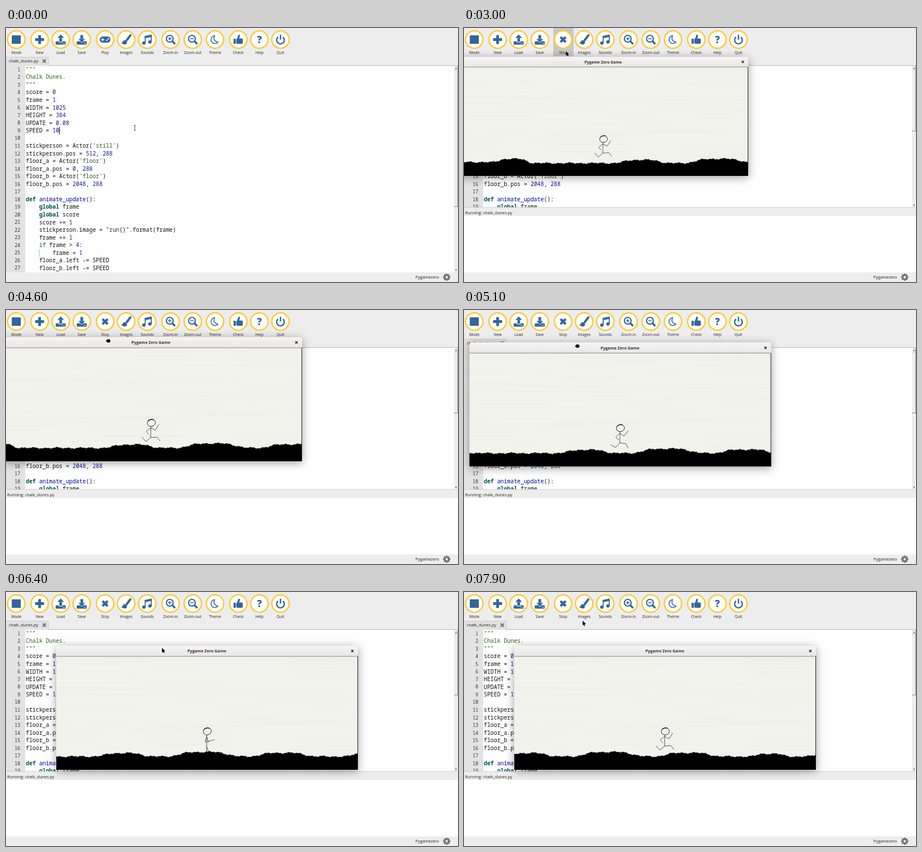
Write an HTML page with a canvas that moves like this. It is 800 px wide and 450 px high and loops after 8000 ms.

```html
<!DOCTYPE html>
<html lang="en">
<head>
<meta charset="utf-8">
<title>Code editor and game</title>
<style>
html, body { margin: 0; width: 100%; height: 100%; overflow: hidden; background: #fff; }
canvas { display: block; width: 800px; height: 450px; }
</style>
</head>
<body>
<canvas id="stage" width="800" height="450"></canvas>
<script>
const ctx = document.getElementById('stage').getContext('2d');
const LOOP = 8000, TICK = 100;
const UI = '"Open Sans", "Noto Sans", sans-serif';
const MONO = '"Noto Sans Mono", "DejaVu Sans Mono", monospace';
const BLUE = '#336699', YELLOW = '#fdcb35', CHROME = '#eeedee';
const CHAR_W = 5.91, LINE_H = 13.53;
const RUN_AT = 2400, OPEN_AT = 2850, OPEN_MS = 250;
const WIN_W = 534, WIN_H = 220, BAR_H = 19;
const STEP_MS = 81.25, STEP_PX = 5.21;
const FILE = 'chalk_dunes.py';

const code = `"""
Chalk Dunes.
"""
score = 0
frame = 1
WIDTH = 1025
HEIGHT = 384
UPDATE = 0.08
SPEED = 10

stickperson = Actor('still')
stickperson.pos = 512, 288
floor_a = Actor('floor')
floor_a.pos = 0, 288
floor_b = Actor('floor')
floor_b.pos = 2048, 288

def animate_update():
    global frame
    global score
    score += 1
    stickperson.image = "run{}".format(frame)
    frame += 1
    if frame > 4:
        frame = 1
    floor_a.left -= SPEED
    floor_b.left -= SPEED`.split('\n');

// Hills: centre, half width, height
const hills = [[30, 45, 2], [100, 28, 8], [338, 36, 6], [480, 46, 8],
  [620, 42, 6.5], [765, 25, 5], [865, 25, 4]];

const mix = (a, b, p) => a + (b - a) * p;

// Eased move from point a to point b
function glide(t, t0, t1, a, b) {
  const p = Math.min(1, Math.max(0, (t - t0) / (t1 - t0)));
  const e = p * p * (3 - 2 * p);
  return [mix(a[0], b[0], e), mix(a[1], b[1], e)];
}

const windowAt = t => glide(t, 4700, 6100, [-10, 48], [89, 95]);

function rect(x, y, w, h, color) {
  ctx.fillStyle = color;
  ctx.fillRect(x, y, w, h);
}

function text(str, x, y, font, color, align = 'left') {
  ctx.font = font;
  ctx.fillStyle = color;
  ctx.textAlign = align;
  ctx.fillText(str, x, y);
}

function trace(pts) {
  ctx.beginPath();
  for (let i = 0; i < pts.length; i += 2) ctx.lineTo(pts[i], pts[i + 1]);
}

function line(pts, color, width = 1) {
  trace(pts);
  ctx.strokeStyle = color;
  ctx.lineWidth = width;
  ctx.stroke();
}

function shape(pts, color) {
  trace(pts);
  ctx.fillStyle = color;
  ctx.fill();
}

function disc(x, y, r, color) {
  ctx.beginPath();
  ctx.arc(x, y, r, 0, 7);
  ctx.fillStyle = color;
  ctx.fill();
}

function ring(x, y, r, color, width, from = 0, to = Math.PI * 2) {
  ctx.beginPath();
  ctx.arc(x, y, r, from, to);
  ctx.strokeStyle = color;
  ctx.lineWidth = width;
  ctx.stroke();
}

function box(x, y, w, h, r, color) {
  ctx.beginPath();
  ctx.roundRect(x, y, w, h, r);
  ctx.fillStyle = color;
  ctx.fill();
}

function cross(x, y, r, color, width) {
  line([x - r, y - r, x + r, y + r], color, width);
  line([x - r, y + r, x + r, y - r], color, width);
}

function tray(tip, dir) {
  box(-9, 3, 18, 6, 1.5, BLUE);
  const arrow = (grow, color) => {
    const base = tip + dir * 6, tail = tip + dir * 13;
    shape([-6 - grow, base + dir * grow, 6 + grow, base + dir * grow, 0, tip - dir * grow], color);
    line([0, base, 0, tail + dir * grow], color, 4.8 + 2 * grow);
  };
  arrow(1, '#fff');
  arrow(0, BLUE);
  for (const x of [4, 6.3]) rect(x, 6, 1.3, 1.3, '#fff');
}

function lens(plus) {
  line([3, 3, 8, 8], BLUE, 3.2);
  ring(-1.5, -1.5, 6, BLUE, 2.2);
  rect(-4.5, -2.2, 6, 1.5, BLUE);
  if (plus) rect(-2.2, -4.5, 1.5, 6, BLUE);
}

const icons = {
  Mode() { rect(-8, -7.5, 16, 15, BLUE); },
  New() {
    box(-8, -2.4, 16, 4.8, 1, BLUE);
    box(-2.4, -8, 4.8, 16, 1, BLUE);
  },
  Load() { tray(-9, 1); },
  Save() { tray(5, -1); },
  Play() {
    box(-9.5, -5.5, 19, 11, 5.5, BLUE);
    rect(-7, -.8, 5.4, 1.6, '#fff');
    rect(-5.1, -2.7, 1.6, 5.4, '#fff');
    disc(3.2, 1.3, 1.3, '#fff');
    disc(5.8, -1.3, 1.3, '#fff');
  },
  Stop() { cross(0, 0, 4.6, BLUE, 4.2); },
  Images() {
    ctx.lineCap = 'round';
    line([7.5, -7.5, 1, 1], BLUE, 3.8);
    disc(-2.5, 5, 3.8, BLUE);
    shape([-2, 1, -2, 8.8, -9, 6.5], BLUE);
  },
  Sounds() {
    line([-4.5, -4.2, 8, -7], BLUE, 4);
    for (const [x, y] of [[-6, 6.3], [4.7, 4.2]]) {
      line([x + 2.4, y - 10, x + 2.4, y], BLUE, 1.8);
      disc(x, y, 3, BLUE);
    }
  },
  'Zoom-in'() { lens(true); },
  'Zoom-out'() { lens(false); },
  Theme() {
    ctx.beginPath();
    ctx.arc(0, 0, 7, .65, 4.6);
    ctx.quadraticCurveTo(-4.5, 3, 5.6, 4.2);
    ctx.strokeStyle = BLUE;
    ctx.lineWidth = 1.6;
    ctx.stroke();
  },
  Check() {
    box(-8.5, -1.5, 4, 9, .8, BLUE);
    box(-3.6, -2, 11.6, 9.6, 2.5, BLUE);
    ctx.lineCap = 'round';
    line([-1, 0, 1.3, -6.8], BLUE, 3.4);
  },
  Help() { text('?', 0, 6.2, `800 17px ${UI}`, BLUE, 'center'); },
  Quit() {
    ring(0, .8, 6.8, BLUE, 2.4, -.9, Math.PI + .9);
    line([0, -8.5, 0, 0], BLUE, 2.4);
  }
};

const toolbar = 'Mode | New Load Save | Play Images Sounds | Zoom-in Zoom-out Theme | Check Help Quit';

function drawToolbar(running, hover) {
  rect(0, 0, 800, 67, CHROME);
  if (hover) rect(158, 0, 36, 50, '#c9c8c9');
  let x = 18.2;
  for (const name of toolbar.split(' ')) {
    if (name === '|') {
      x += 4;
      continue;
    }
    const label = name === 'Play' && running ? 'Stop' : name;
    disc(x, 20.5, 16, '#fff');
    ring(x, 20.5, 15.4, YELLOW, 2.5);
    ctx.save();
    ctx.translate(x, 20.5);
    icons[label]();
    ctx.restore();
    text(label, x, 45.5, `6.7px ${UI}`, '#222', 'center');
    x += name.startsWith('Zoom') ? 39.3 : 37.3;
  }
  rect(0, 66, 800, 1, '#bdbdbd');
  box(0, 51.5, 75.5, 15.5, [0, 2, 0, 0], '#bdbdbd');
  box(0, 52.3, 74.7, 14.7, [0, 2, 0, 0], '#e3e2e3');
  text(FILE, 5, 61.3, `7.3px ${UI}`, '#222');
  cross(67.7, 58.7, 2.8, '#777', 2.2);
}

function tokenColor(tok, prev) {
  if (/^(def|global|if)$/.test(tok)) return '#005050';
  if (prev === 'def') return '#0000a0';
  if (/^\d/.test(tok)) return '#16168b';
  if (tok[0] === "'") return '#35581f';
  if (tok[0] === '"') return '#2c2c44';
  return '#111';
}

function drawLine(str, n) {
  const y = 76.9 + n * LINE_H;
  text(n + 1, 25.3, y - .2, `8.4px ${MONO}`, '#333', 'right');
  if (n < 3) return text(str, 35, y, `9.85px ${MONO}`, '#2d6414');
  let prev = '';
  for (const m of str.matchAll(/'[^']*'|"[^"]*"|\d+(\.\d+)?|\w+|[^\w\s'"]+/g)) {
    const bold = /^(def|global)$/.test(m[0]) ? 'bold ' : '';
    text(m[0], 35 + m.index * CHAR_W, y, `${bold}9.85px ${MONO}`, tokenColor(m[0], prev));
    prev = m[0];
  }
}

function drawScrollbar(bottom, thumbEnd) {
  rect(793, 67, 7, bottom - 67, '#efeeef');
  rect(793, 74.5, 7, .7, '#bbb');
  rect(799, 67, 1, thumbEnd - 67, '#888');
  rect(793, thumbEnd - 1, 7, 1, '#888');
  shape([795, 72.5, 798, 72.5, 796.5, 70], '#444');
  shape([795, bottom - 5, 798, bottom - 5, 796.5, bottom - 2.5], '#444');
}

function drawEditor(bottom, thumbEnd, caret) {
  ctx.save();
  ctx.beginPath();
  ctx.rect(0, 67, 800, bottom - 67);
  ctx.clip();
  rect(0, 67, 800, 383, '#fefeff');
  rect(0, 67, 34, 383, '#e3e3e3');
  code.forEach(drawLine);
  rect(58.6, 392, .9, 13, '#aaa');
  if (caret) rect(94, 175, 1, 13.5, '#000');
  drawScrollbar(bottom, thumbEnd);
  ctx.restore();
}

function drawStatus() {
  rect(0, 433, 800, 17, CHROME);
  text('Pygamezero', 766.5, 444.2, `7.3px ${UI}`, '#222', 'right');
  ctx.save();
  ctx.translate(780, 441.5);
  ring(0, 0, 3.6, '#737373', 2.8);
  for (let i = 0; i < 8; i++) {
    ctx.rotate(Math.PI / 4);
    rect(-1.4, -6.5, 2.8, 4, '#737373');
  }
  ctx.restore();
}

function drawOutput() {
  rect(0, 318, 800, 15, CHROME);
  rect(0, 317.5, 800, .8, '#c4c4c4');
  rect(0, 333, 800, 100, '#fff');
  text(`Running: ${FILE}`, 2, 329.8, `7.25px ${UI}`, '#222');
}

function groundHeight(u) {
  let h = 23.5 + .8 * Math.sin(u * .31 + 1) + .6 * Math.sin(u * .13) + .5 * Math.sin(u * .9);
  for (const [mid, half, top] of hills) h += top * Math.exp(-(((u - mid) / half) ** 4));
  return h;
}

function drawGround(scroll) {
  const edge = [];
  for (let x = 0; x <= WIN_W; x += 2) edge.push(x, WIN_H - groundHeight(x + scroll));
  shape([0, WIN_H, ...edge, WIN_W, WIN_H], '#000');
  line(edge, 'rgba(60,60,60,.55)');
}

function drawPaper() {
  ctx.save();
  ctx.beginPath();
  ctx.rect(0, BAR_H, WIN_W, WIN_H - BAR_H);
  ctx.clip();
  rect(0, BAR_H, WIN_W, WIN_H, '#f2f2ed');
  let seed = 7;
  const rand = () => (seed = seed * 16807 % 2147483647) / 2147483647;
  for (let i = 0; i < 90; i++) {
    const tint = rand() < .5 ? 'rgba(255,255,255,.2)' : 'rgba(120,120,90,.03)';
    rect(rand() * WIN_W - 60, BAR_H + rand() * 180, 40 + rand() * 160, 1, tint);
  }
  ctx.restore();
}

// Two-part limb; angles in degrees, 0 hangs down, 90 points ahead
function limb(x, y, upper, lower, len1, len2) {
  const a = upper * Math.PI / 180, b = lower * Math.PI / 180;
  const jx = x + len1 * Math.sin(a), jy = y + len1 * Math.cos(a);
  line([x, y, jx, jy, jx + len2 * Math.sin(b), jy + len2 * Math.cos(b)], '#444', .9);
}

function drawRunner(pose) {
  const s = Math.sin(pose * .72);
  line([266.5, 158, 266, 178], '#444', .9);
  limb(266, 161, mix(-15, -52, s), mix(90, 42, s), 10, 7);
  limb(266, 161, mix(20, 64, s), mix(104, 148, s), 9, 12);
  limb(266, 178, mix(0, -50, s), mix(-10, -140, s), 11, 10);
  limb(266, 178, mix(20, 95, s), mix(-40, 40, s), 11, 9);
  ctx.beginPath();
  ctx.ellipse(267.3, 152, 7.2, 6.2, -.25, 0, 7);
  ctx.strokeStyle = '#222';
  ctx.lineWidth = 1;
  ctx.stroke();
  ctx.beginPath();
  ctx.ellipse(267.3, 152, 7.2, 6.2, -.25, 3.9, 5.5);
  ctx.lineWidth = 1.5;
  ctx.stroke();
}

function drawGame(t) {
  const stalled = t >= 5000 && t < 5200 ? 1 : 0;
  const step = Math.floor((t - OPEN_AT) / STEP_MS + .6) - stalled;
  const [x, y] = windowAt(t);
  const p = Math.min(1, (t - OPEN_AT) / OPEN_MS);
  const scale = 1 - .25 * (1 - p) ** 2;

  ctx.save();
  ctx.globalAlpha = Math.min(1, p * 1.8);
  ctx.translate(0, 120);
  ctx.scale(scale, scale);
  ctx.translate(x, y - 120);

  ctx.save();
  ctx.shadowColor = 'rgba(0,0,0,.38)';
  ctx.shadowBlur = 16;
  ctx.shadowOffsetY = 3;
  const bar = ctx.createLinearGradient(0, 0, 0, BAR_H);
  bar.addColorStop(0, '#f5f4f3');
  bar.addColorStop(1, '#e9e7e5');
  box(0, 0, WIN_W, WIN_H, [4, 4, 0, 0], bar);
  ctx.restore();
  text('Pygame Zero Game', 266.5, 12.2, `bold 7.2px ${UI}`, '#333', 'center');
  cross(524, 9.5, 1.9, '#222', 1.4);

  drawPaper();
  drawRunner(step % 4);
  drawGround(Math.max(0, (step - 2) * STEP_PX));
  rect(0, BAR_H - .5, WIN_W, 1, '#8a8886');
  rect(WIN_W - 1, BAR_H, 1, WIN_H - BAR_H, '#222');
  ctx.restore();
}

function drawBeam(x, y) {
  rect(x - .5, y - 4.5, 1, 9, '#555');
  for (const end of [-5, 4]) rect(x - 2, y + end, 4, 1, '#777');
}

function drawArrow(x, y) {
  const head = [x, y, x, y + 8, x + 5.7, y + 5.6];
  line([...head, x, y], 'rgba(255,255,255,.8)', 1.2);
  shape(head, '#000');
  line([x + 2, y + 5, x + 3.8, y + 9], '#000', 1.5);
}

function drawHand(x, y) {
  box(x - 3.8, y - 2, 7.6, 3.4, 1.5, '#111');
  box(x - 2.4, y - 3.2, 5.6, 6, 1.8, '#111');
}

function drawPointer(t) {
  const [x, y] = windowAt(t);
  const grip = [x + 187, y + 4];
  if (t < 2000) drawBeam(...glide(t, 1200, 1900, [228, 177], [185, 57]));
  else if (t < 4200) drawArrow(...glide(t, 2000, 2200, [183, 45], [180.5, 41]));
  else if (t < 4600) drawArrow(...glide(t, 4200, 4500, [180.5, 41], grip));
  else if (t < 6200) drawHand(x + 191, y + 7);
  else drawArrow(...glide(t, 7400, 7850, grip, [210, 51]));
}

function draw(t) {
  const running = t >= RUN_AT;
  const caret = t < 800 || (t >= 1300 && t < 1800);
  drawToolbar(running, t >= 2000 && t < 4400);
  if (running) {
    drawEditor(318, 183, false);
    drawOutput();
  } else {
    drawEditor(433, 317, caret);
  }
  drawStatus();
  if (t > OPEN_AT) drawGame(t);
  drawPointer(t);
}

const start = performance.now();
function loop() {
  const t = (performance.now() - start) % LOOP;
  draw(Math.floor(t / TICK) * TICK);
  requestAnimationFrame(loop);
}
loop();
</script>
</body>
</html>
```
